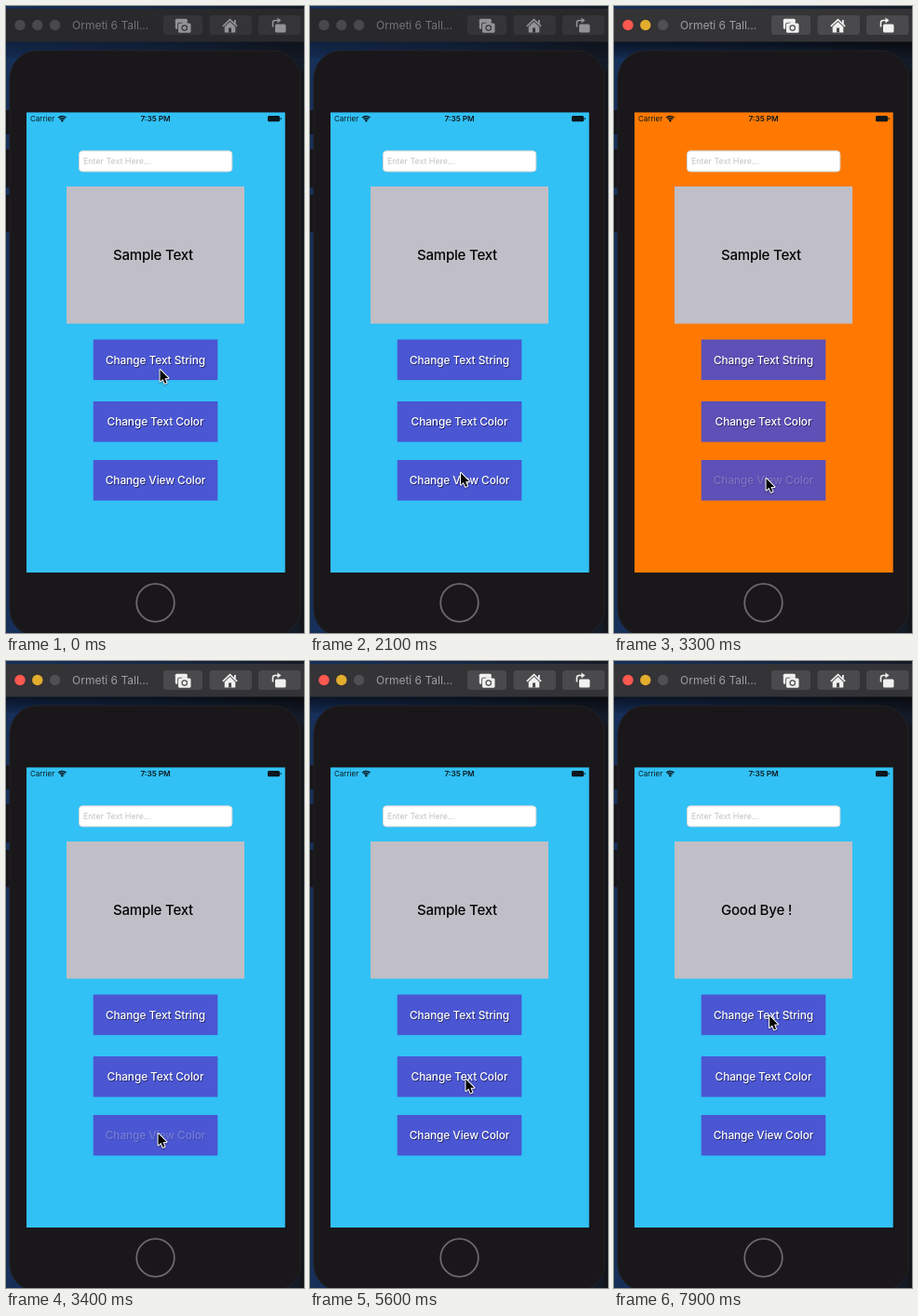
An HTML page with a canvas for the animation above (8000 ms loop, 320 by 674 pixels).

```html
<!DOCTYPE html>
<html lang="en">
<head>
<meta charset="utf-8">
<title>Phone simulator</title>
<style>
  html, body { margin: 0; width: 100%; height: 100%; overflow: hidden; background: #0b1018; }
  canvas { display: block; width: 320px; height: 674px; }
</style>
</head>
<body>
<canvas id="stage"></canvas>
<script>
const W = 320, H = 674, LOOP = 8000;
const canvas = document.getElementById('stage');
const dpr = window.devicePixelRatio || 1;
canvas.width = W * dpr;
canvas.height = H * dpr;
const ctx = canvas.getContext('2d');

// Rests and moves of the pointer: [time, x, y]
const pointerPath = [
  [0, 165.5, 391], [900, 167.5, 387], [1000, 167.5, 387], [1200, 165.5, 386],
  [1300, 165.5, 386], [2100, 162, 502], [2400, 163.5, 507.5], [3600, 163.5, 508],
  [4350, 167.5, 452], [5500, 167.5, 452], [6300, 165.5, 397], [6450, 165.5, 397],
  [6850, 167, 382], [8000, 167, 381.5]
];
const ACTIVATE = 2400, ORANGE = [2500, 3350], GOODBYE = 7000;
const FADE = 450;
const buttons = [
  { label: 'Change Text String', y: 358.5, presses: [[6880, GOODBYE]] },
  { label: 'Change Text Color', y: 425, presses: [[4520, 4640]] },
  { label: 'Change View Color', y: 488, presses: [[2400, ORANGE[0]], [3230, ORANGE[1]]] }
];

const clamp = v => Math.max(0, Math.min(1, v));
const smooth = v => v * v * (3 - 2 * v);

function pointerAt(t) {
  const i = pointerPath.findIndex(p => p[0] > t);
  const [t0, x0, y0] = pointerPath[i - 1], [t1, x1, y1] = pointerPath[i];
  const k = smooth((t - t0) / (t1 - t0));
  return [x0 + (x1 - x0) * k, y0 + (y1 - y0) * k];
}

function labelAlpha(presses, t) {
  const press = presses.find(([down, up]) => t >= down && t < up + FADE);
  return press ? 0.22 + 0.78 * smooth(clamp((t - press[1]) / FADE)) : 1;
}

function rect(x, y, w, h, color) {
  ctx.fillStyle = color;
  ctx.fillRect(x, y, w, h);
}

function round(x, y, w, h, r, color, stroke) {
  ctx.beginPath();
  ctx.roundRect(x, y, w, h, r);
  ctx.fillStyle = color;
  ctx.fill();
  if (stroke) {
    ctx.strokeStyle = stroke;
    ctx.lineWidth = 1;
    ctx.stroke();
  }
}

function circle(x, y, r, color) {
  ctx.beginPath();
  ctx.arc(x, y, r, 0, Math.PI * 2);
  ctx.fillStyle = color;
  ctx.fill();
}

function poly(color, ...pts) {
  ctx.beginPath();
  pts.forEach(([x, y]) => ctx.lineTo(x, y));
  ctx.closePath();
  ctx.fillStyle = color;
  ctx.fill();
}

function text(str, x, y, size, color, { weight = 400, align = 'left', spacing = 0 } = {}) {
  ctx.font = `${weight} ${size}px Inter, Roboto, sans-serif`;
  ctx.letterSpacing = spacing + 'px';
  ctx.textAlign = align;
  ctx.fillStyle = color;
  ctx.fillText(str, x, y);
}

function drawDesktop(active) {
  const g = ctx.createLinearGradient(0, 0, W, 0);
  g.addColorStop(0, '#16305a');
  g.addColorStop(0.5, '#152846');
  g.addColorStop(1, '#141a26');
  rect(0, 0, W, H, g);
  const shade = ctx.createLinearGradient(0, 38, 0, 56);
  shade.addColorStop(0, `rgba(0,0,0,${active ? 0.6 : 0.3})`);
  shade.addColorStop(1, 'rgba(0,0,0,.1)');
  rect(0, 38, W, 18, shade);
  rect(315, 70, 5, H, '#14161b');
  [[112, 26], [154, 41], [203, 40]].forEach(([y, h]) => rect(0, y, 5, h, '#15151a'));
}

function drawCamera(c, hole) {
  round(181.8, 13.8, 13, 11, 1.5, c);
  round(184.2, 17.8, 15, 11.7, 2, hole);
  round(185, 18.6, 13.5, 10.2, 1.5, c);
  round(189, 17.2, 5.5, 3, 1, c);
  circle(191.7, 23.6, 3.3, hole);
  circle(191.7, 23.6, 2.1, c);
}

function drawHome(c, hole) {
  poly(c, [240.5, 13.5], [248.7, 21.3], [247.6, 22.4], [240.5, 15.7], [233.4, 22.4], [232.3, 21.3]);
  rect(245, 15, 1.8, 4, c);
  poly(c, [240.5, 17], [246.3, 22.5], [246.3, 28.5], [234.7, 28.5], [234.7, 22.5]);
  rect(239, 23.5, 3, 5, hole);
}

function drawRotate(c) {
  round(289, 19.5, 11.5, 9, 1.5, c);
  ctx.beginPath();
  ctx.moveTo(286.5, 22.5);
  ctx.lineTo(286.5, 18);
  ctx.quadraticCurveTo(286.5, 15.5, 289, 15.5);
  ctx.lineTo(292, 15.5);
  ctx.strokeStyle = c;
  ctx.lineWidth = 1.6;
  ctx.stroke();
  poly(c, [291.5, 12.5], [295.5, 15.5], [291.5, 18.5]);
}

function drawTitleBar(active) {
  const face = active ? '#4a494b' : '#353437';
  const icon = active ? '#f0f0f1' : '#939295';
  round(-4, 3, 328, 35.5, 4, active ? '#343335' : '#29282b');
  const lights = active ? ['#fc584f', '#e3ae2d', '#505052'] : Array(3).fill('#49484b');
  lights.forEach((c, i) => circle(15 + 18.8 * i, 20.5, 5.7, c));
  text('Ormeti 6 Tall...', 71, 25, 12, active ? '#a09fa2' : '#747376');
  [[169, 42], [218.5, 45.5], [271, 45.5]].forEach(([x, w]) => round(x, 10, w, 21, 3.5, face));
  drawCamera(icon, face);
  drawHome(icon, face);
  drawRotate(icon);
}

function drawStatusBar() {
  const ink = '#0b171d';
  text('Carrier', 26, 124.3, 8, ink);
  ctx.strokeStyle = ink;
  ctx.lineWidth = 1.5;
  [3.3, 5.6].forEach(r => {
    ctx.beginPath();
    ctx.arc(60.3, 124, r, -Math.PI * 0.76, -Math.PI * 0.24);
    ctx.stroke();
  });
  circle(60.3, 123.3, 1.2, ink);
  text('7:35 PM', 160.5, 124.3, 8.2, ink, { weight: 600, align: 'center' });
  round(281, 118, 13, 6.2, 1.5, ink);
  round(294.6, 120, 1.1, 2.3, 0.5, ink);
}

function drawButton({ label, y, presses }, t, color) {
  rect(93.7, y, 133.6, 43.6, color);
  const style = { weight: 500, align: 'center', spacing: -0.05 };
  ctx.globalAlpha = labelAlpha(presses, t);
  text(label, 161.3, y + 27, 11.8, 'rgba(10,10,40,.6)', style);
  text(label, 160.5, y + 26.2, 11.8, '#fff', style);
  ctx.globalAlpha = 1;
}

function drawPhone(t) {
  const orange = t >= ORANGE[0] && t < ORANGE[1];
  round(4, 48, 312, 630, 30, '#1a171a', '#232125');
  ctx.beginPath();
  ctx.arc(160.5, 641.5, 20.3, 0, Math.PI * 2);
  ctx.strokeStyle = '#6b696c';
  ctx.lineWidth = 1.8;
  ctx.stroke();

  rect(22, 114.4, 277.7, 494.6, orange ? '#ff7900' : '#31c1f5');
  drawStatusBar();
  round(78.5, 155.8, 164.3, 22.2, 3.5, '#fff', '#cfd6da');
  text('Enter Text Here...', 83, 170, 8.9, '#c3c3c6');
  rect(65, 194, 191, 147.5, '#c0bec6');
  const message = t < GOODBYE ? 'Sample Text' : 'Good Bye !';
  text(message, 115, 273.3, 15, '#050505', { weight: 500, spacing: -0.2 });
  buttons.forEach(b => drawButton(b, t, orange ? '#5d50b7' : '#4a56d2'));
}

function drawPointer(x, y) {
  ctx.save();
  ctx.translate(x, y);
  ctx.beginPath();
  [[0, 0], [0, 12.6], [2.9, 9.9], [5, 14.8], [7, 13.9], [5, 9.2], [8.9, 9]]
    .forEach(p => ctx.lineTo(...p));
  ctx.closePath();
  ctx.shadowColor = 'rgba(0,0,0,.4)';
  ctx.shadowBlur = 2 * dpr;
  ctx.shadowOffsetY = dpr;
  ctx.lineJoin = 'round';
  ctx.lineWidth = 2;
  ctx.strokeStyle = '#fff';
  ctx.stroke();
  ctx.shadowColor = 'transparent';
  ctx.fillStyle = '#050505';
  ctx.fill();
  ctx.restore();
}

function draw(t) {
  const active = t >= ACTIVATE;
  ctx.setTransform(dpr, 0, 0, dpr, 0, 0);
  drawDesktop(active);
  drawTitleBar(active);
  drawPhone(t);
  drawPointer(...pointerAt(t));
}

let start;
function tick(now) {
  start ??= now;
  draw(Math.max(0, now - start) % LOOP);
  requestAnimationFrame(tick);
}
draw(0);
requestAnimationFrame(tick);
</script>
</body>
</html>
```
